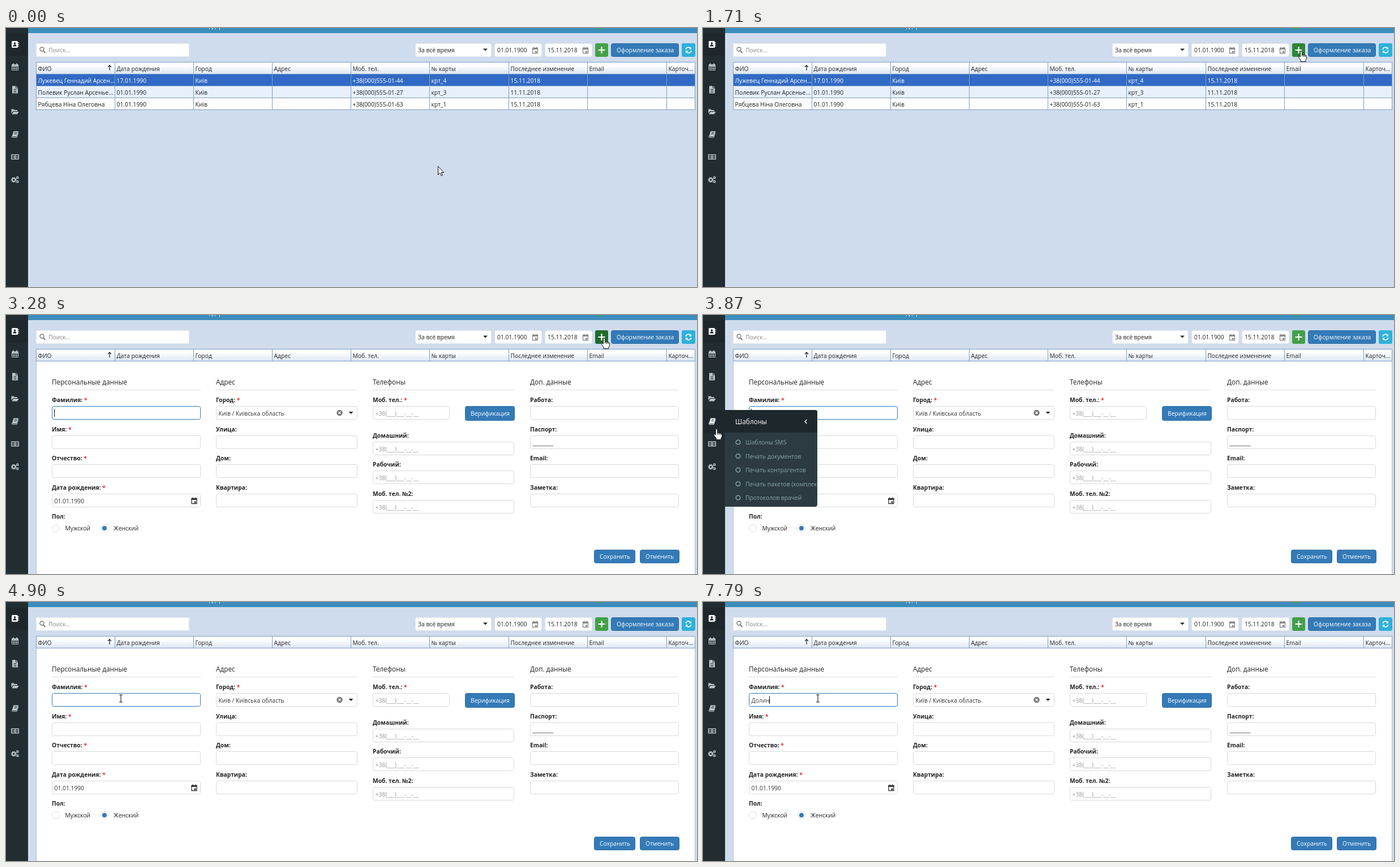
These frames come from a looping animation (1221 by 458 pixels, 8 s). An HTML page:

```html
<!DOCTYPE html>
<html lang="ru">
<head>
<meta charset="utf-8">
<title>Картотека</title>
<style>
  html, body { margin: 0; width: 100%; height: 100%; overflow: hidden; background: #cfdced; }
  svg { display: block; width: 1221px; height: 458px; font: 10.3px "Open Sans", "Noto Sans", sans-serif; }
  text { white-space: pre; }
  .label { font-weight: 700; }
  .title { font-size: 11.8px; }
</style>
</head>
<body>
<svg id="stage" viewBox="0 0 1221 458"></svg>
<script>
const BLUE = '#337ab7', GRID = '#7c9fc2', FIELD = '#d5dade', INK = '#222', ICON = '#b8c7ce';
const LOOP = 8000;

const fillRect = (x, y, w, h, fill, r = 0) =>
  `<rect x="${x}" y="${y}" width="${w}" height="${h}" rx="${r}" fill="${fill}"/>`;
const box = (x, y, w, h, fill, stroke, r = 3) =>
  `<rect x="${x + .5}" y="${y + .5}" width="${w - 1}" height="${h - 1}" rx="${r}" fill="${fill}" stroke="${stroke}"/>`;
// Text is placed by its left edge and the vertical middle of its capitals.
const text = (x, y, str, fill = INK, cls = '') =>
  `<text x="${x}" y="${y + 4}" fill="${fill}" class="${cls}">${str}</text>`;
const path = (d, fill, stroke = 'none', width = 1) =>
  `<path d="${d}" fill="${fill}" stroke="${stroke}" stroke-width="${width}"/>`;
const circle = (x, y, r, fill, stroke = 'none', width = 1) =>
  `<circle cx="${x}" cy="${y}" r="${r}" fill="${fill}" stroke="${stroke}" stroke-width="${width}"/>`;
const at = (x, y, content, id = '') => `<g id="${id}" transform="translate(${x} ${y})">${content}</g>`;
const group = (id, content) => `<g id="${id}">${content}</g>`;
const triangle = (x, y) => path(`M${x - 4} ${y - 2}h8l-4 4z`, INK);
const button = (x, y, w, h, label, pad = 10) =>
  box(x, y, w, h, BLUE, '#2e6da4') + text(x + pad, y + h / 2, label, '#fff');
const calendar = (x, y, color) => at(x, y,
  path('M-4.5 -4h9v9h-9z', 'none', color, 1.3) + fillRect(-5, -4.5, 10, 3, color) +
  path('M-2.5 -6v2M2.5 -6v2', 'none', color, 1.3) + fillRect(0, 1, 3, 3, color));

const sideIcons = {
  contacts: c => fillRect(-6, -6, 11, 12, c, 1.5) + circle(-.5, -2, 1.8, '#1e282c') +
    path('M-3.5 3.5q0-3.5 3-3.5t3 3.5z', '#1e282c') + path('M6 -4v2M6 -1v2M6 2v2', 'none', c, 1.2),
  calendar: c => path('M-5.5 -4h11v9.5h-11zM-5.5 -1h11M-5.5 2.3h11M-2 -1v6.5M2 -1v6.5', 'none', c) +
    fillRect(-6, -4.5, 12, 3, c) + path('M-3 -6.5v3M3 -6.5v3', 'none', c, 1.8),
  file: c => path('M-5 -6.5h6v4h4v9h-10zM2 -6.5l3 3h-3z', c) +
    path('M-2.5 -.5h5M-2.5 2h5M-2.5 4.3h5', 'none', '#222d32'),
  folder: c => path('M-6.5 3v-7.5h4l1.5 1.5h5v2h-7.5zM-5.8 4.5l3-4.5h9.5l-3 4.5z', c),
  book: c => path('M-2.5 -5.5h8.5l-3 9.5h-8.5z', c) +
    path('M-5.5 3q-1 2.5 1 2.5h7.5l3-9M-1 -3h4M-1.8 -.8h4', 'none', c) +
    path('M-.8 -3h4.5M-1.6 -.7h4.5', 'none', '#222d32'),
  money: c => path('M-6.2 -3.8h12.4v7.6h-12.4z', 'none', c, 1.5) + circle(0, 0, 2.6, c) +
    path('M0 -1.5v3', 'none', '#222d32') + path('M-5 0h1M4 0h1', 'none', c, 2),
  gears: c => circle(-2.3, .5, 2.8, 'none', c, 2) +
    `<circle cx="-2.3" cy=".5" r="4.2" fill="none" stroke="${c}" stroke-width="1.4" stroke-dasharray="1.7 1.6"/>` +
    circle(4.3, -3.3, 1.6, 'none', c, 1.5) + circle(4.3, 3.8, 1.6, 'none', c, 1.5),
};

function sidebar() {
  const icons = Object.entries(sideIcons).map(([name, draw], i) =>
    at(16, [29, 69, 109, 148, 188, 228, 268][i], draw(i ? ICON : '#fff'))).join('');
  return fillRect(0, 0, 39, 458, '#222d32') + fillRect(0, 9, 39, 40, '#1e282c') + icons;
}

function topBar() {
  return fillRect(0, 0, 1221, 9, '#3c8dbc') + fillRect(0, 0, 39, 9, '#367fa9') +
    text(345, -4, 'Поддержка', '#fff') + circle(1048, -6, 8, '#43a047');
}

function toolbar() {
  const dates = [[863, '01.01.1900'], [952, '15.11.2018']].map(([x, date]) =>
    box(x, 27, 84, 24, '#fff', '#e3e7ec') + text(x + 5, 39, date) + calendar(x + 72, 39.5, '#888')).join('');
  return box(53, 27, 271, 24, '#fff', '#e3e7ec', 1) +
    circle(63.5, 37.5, 3.5, 'none', '#777', 1.4) + path('M66 40.5l3.5 3.5', 'none', '#777', 1.8) +
    text(75, 39, 'Поиск...', '#8a8a8a') +
    box(723, 27, 135, 24, '#fff', '#e3e7ec') + text(728, 39, 'За всё время') + triangle(847, 38.5) + dates +
    `<rect id="plus" x="1041" y="27" width="23" height="24" rx="3"/>` +
    path('M1046.5 39h12M1052.5 33v12', 'none', '#fff', 2.2) +
    button(1069, 27, 120, 24, 'Оформление заказа') +
    fillRect(1194, 27, 24, 24, '#2fb1d8', 3) +
    path('M1201.3 38a4.5 4.5 0 0 1 8-2.2M1210.7 40a4.5 4.5 0 0 1-8 2.2', 'none', '#fff', 1.7) +
    path('M1211 33.5v4.2h-4.2zM1201 44.5v-4.2h4.2z', '#fff');
}

const edges = [53, 192, 331, 470, 609, 748, 888, 1027, 1167, 1217];
const headings = ['ФИО', 'Дата рождения', 'Город', 'Адрес', 'Моб. тел.', '№ карты',
  'Последнее изменение', 'Email', 'Карточ...'];
const people = [
  ['Лужевец Геннадий Арсен...', '17.01.1990', 'Київ', '', '+38(000)555-01-44', 'крт_4', '15.11.2018'],
  ['Полевик Руслан Арсенье...', '01.01.1990', 'Київ', '', '+38(000)555-01-27', 'крт_3', '11.11.2018'],
  ['Рябцева Ніна Олеговна', '01.01.1990', 'Київ', '', '+38(000)555-01-63', 'крт_1', '15.11.2018'],
];
const columnLines = (y, h) => path(edges.map(x => `M${x + .5} ${y}v${h}`).join(''), 'none', GRID);

function tableHead() {
  return fillRect(53, 60, 1164, 22, 'url(#head)') + columnLines(60, 22) +
    path('M53 60.5h1165M53 81.5h1165', 'none', GRID) +
    headings.map((str, i) => text(edges[i] + 3.5, 71.5, str)).join('') +
    path('M183 75v-9M180 69.2l3-3.2 3 3.2', 'none', INK, 1.2);
}

function tableRows() {
  const fills = ['#316ac5', '#e8f0fc', '#fdfdfd'];
  return people.map((cells, row) => {
    const y = 82 + row * 21;
    return fillRect(53, y, 1164, 21, fills[row]) +
      path(`M53 ${y + 20.5}h1165`, 'none', GRID) +
      cells.map((str, i) => text(edges[i] + 3.5, y + 11, str, row ? INK : '#fff')).join('');
  }).join('') + columnLines(82, 63);
}

const label = (x, y, str) => {
  const required = str.endsWith('*');
  return `<text x="${x}" y="${y + 4}" fill="${INK}" class="label">${str.replace('*', '')}` +
    (required ? '<tspan fill="#e53935">*</tspan>' : '') + '</text>';
};
const input = (x, y, w, value = '', color = '#333', stroke = FIELD) =>
  box(x, y, w, 24, '#fff', stroke) + text(x + 4.5, y + 12.5, value, color);

function form() {
  const mask = '+38(___)___-__-__';
  const columns = [
    [81, 263, 'Персональные данные', ['Фамилия: *', 'Имя: *', 'Отчество: *', 'Дата рождения: *'], ['', '', '', '01.01.1990']],
    [371, 250, 'Адрес', ['Город: *', 'Улица:', 'Дом:', 'Квартира:'], ['Київ / Київська область', '', '', '']],
    [648, 250, 'Телефоны', ['Моб. тел.: *', 'Домашний:', 'Рабочий:', 'Моб. тел. №2:'], [mask, mask, mask, mask]],
    [926, 263, 'Доп. данные', ['Работа:', 'Паспорт:', 'Email:', 'Заметка:'], ['', '________', '', '']],
  ];
  const fields = columns.map(([x, w, title, labels, values], col) => {
    const phones = col === 2;
    return text(x, 119, title, INK, 'title') + path(`M${x} 132.5h${w}`, 'none', '#ddd') +
      labels.map((str, i) => {
        const y = Math.round(150 + i * 51.6) + (phones && i ? 11 : 0);
        const focused = !col && !i;
        return label(x, y, str) + input(x, y + 11, phones && !i ? 136 : w, values[i],
          phones ? '#999' : '#333', focused ? BLUE : FIELD);
      }).join('');
  }).join('');
  return fillRect(53, 82, 1164, 376, '#fff') + path('M53.5 82v376M1217.5 82v376', 'none', '#a9c2dc') + fields +
    circle(589.5, 173, 5.2, '#777') + path('M587.5 171l4 4m0-4l-4 4', 'none', '#fff', 1.3) + triangle(609.5, 173) +
    calendar(332.5, 328.5, '#333') + button(811, 161, 88, 26, 'Верификация') +
    label(81, 356, 'Пол:') +
    circle(88, 377, 6.5, '#fff', FIELD) + text(104.5, 377, 'Мужской') +
    circle(174, 377, 6.5, '#fff', FIELD) + circle(174, 377, 4, BLUE) + text(190, 377, 'Женский') +
    button(1039, 415, 73, 24, 'Сохранить') + button(1120, 415, 70, 24, 'Отменить') +
    `<text id="surname" x="85.5" y="177.5" fill="#444"></text>` +
    `<rect id="caret" y="166" width="1" height="14" fill="#111"/>`;
}

function menu() {
  const items = ['Шаблоны SMS', 'Печать документов', 'Печать контрагентов', 'Печать пакетов (комплектов)', 'Протоколов врачей'];
  return fillRect(0, 168, 39, 40, '#1e282c') + at(16, 188, sideIcons.book('#fff')) +
    `<g clip-path="url(#flyout)">` + fillRect(39, 168, 163, 171, '#2c3b41') + fillRect(39, 168, 163, 40, '#1e282c') +
    text(57, 188.5, 'Шаблоны', '#fff', 'title') + path('M183.5 185l-3.5 3.5 3.5 3.5', 'none', '#fff', 1.4) +
    items.map((str, i) => {
      const y = 225 + i * 24.5;
      return circle(62, y, 3.8, 'none', '#8aa4af', 1.5) + text(75, y, str, '#8aa4af');
    }).join('') + '</g>';
}

const cursors = {
  arrow: path('M.5 .5v15l3.4-3.2 2.4 5.2 2.2-1-2.4-5h4.6z', '#fff', '#111'),
  hand: path('M-1.7 2q1.7-2.8 3.2 0v5l5.6 1.2q2.4.5 2.4 3v3l-1.7 3v2.3h-8.6v-2.5l-4-5.5q-.3-2.6 1.7-1.8l1.4 1.6z', '#fff', '#111') +
    path('M1.5 7v3.5M4.3 8v3M7 8.5v3', 'none', '#111'),
  beam: path('M-3 -6.5h2.2l.8.6.8-.6h2.2M0 -6v12M-3 6.5h2.2l.8-.6.8.6h2.2', 'none', '#111', 1.1),
};

document.getElementById('stage').innerHTML = `<defs>
  <linearGradient id="head" x2="0" y2="1"><stop offset=".3" stop-color="#fff"/><stop offset="1" stop-color="#d9e4f3"/></linearGradient>
  <clipPath id="flyout"><path d="M39 168h159q4 0 4 4v163q0 4-4 4h-159z"/></clipPath></defs>` +
  fillRect(0, 0, 1221, 458, '#cfdced') + topBar() + sidebar() + toolbar() + tableHead() +
  group('rows', tableRows()) + group('form', form()) + group('menu', menu()) +
  Object.entries(cursors).map(([name, shape]) => at(0, 0, shape, name)).join('');

// Each track holds its value from the given time until the next entry.
const pointer = [
  [0, 763, 244, 'arrow'], [150, 785, 242, 'arrow'], [290, 850, 235, 'arrow'], [430, 914, 220, 'arrow'],
  [560, 985, 165, 'arrow'], [700, 1025, 127, 'arrow'], [840, 1060, 68, 'arrow'], [980, 1066, 38, 'arrow'],
  [1130, 1057, 40, 'arrow'], [1280, 1057, 40, 'hand'], [3560, 600, 10, 'arrow'], [3710, 120, 150, 'arrow'],
  [3870, 24, 201, 'hand'], [4020, 60, 196, 'hand'], [4170, 130, 186, 'hand'], [4290, 188, 177, 'hand'],
  [4440, 204, 172, 'beam'], [4740, 203, 171, 'beam'], [4900, 203, 170.5, 'beam'],
];
const plusColor = [[0, '#43a047'], [1130, '#2f8535'], [2730, '#1f6b2b'], [3560, '#43a047']];
const typedCount = [[0, 0], [5730, 1], [6320, 2], [6720, 3], [7390, 4], [7790, 5]];
const caretOn = [[0, 1], [4740, 0], [5320, 1], [7270, 0], [7390, 1]];
const current = (track, t) => track.findLast(entry => entry[0] <= t);

const el = id => document.getElementById(id);
const show = (id, visible) => el(id).setAttribute('visibility', visible ? 'visible' : 'hidden');

function render() {
  const t = performance.now() % LOOP;
  const [, x, y, shape] = current(pointer, t);
  const formOpen = t >= 3280;
  for (const name in cursors) show(name, name === shape);
  el(shape).setAttribute('transform', `translate(${x} ${y})`);
  el('plus').setAttribute('fill', current(plusColor, t)[1]);
  show('rows', !formOpen);
  show('form', formOpen);
  show('menu', t >= 3870 && t < 4440);

  const surname = el('surname');
  surname.textContent = 'Долин'.slice(0, current(typedCount, t)[1]);
  el('caret').setAttribute('x', Math.round(85 + surname.getComputedTextLength()));
  show('caret', formOpen && current(caretOn, t)[1]);
  requestAnimationFrame(render);
}
render();
</script>
</body>
</html>
```
